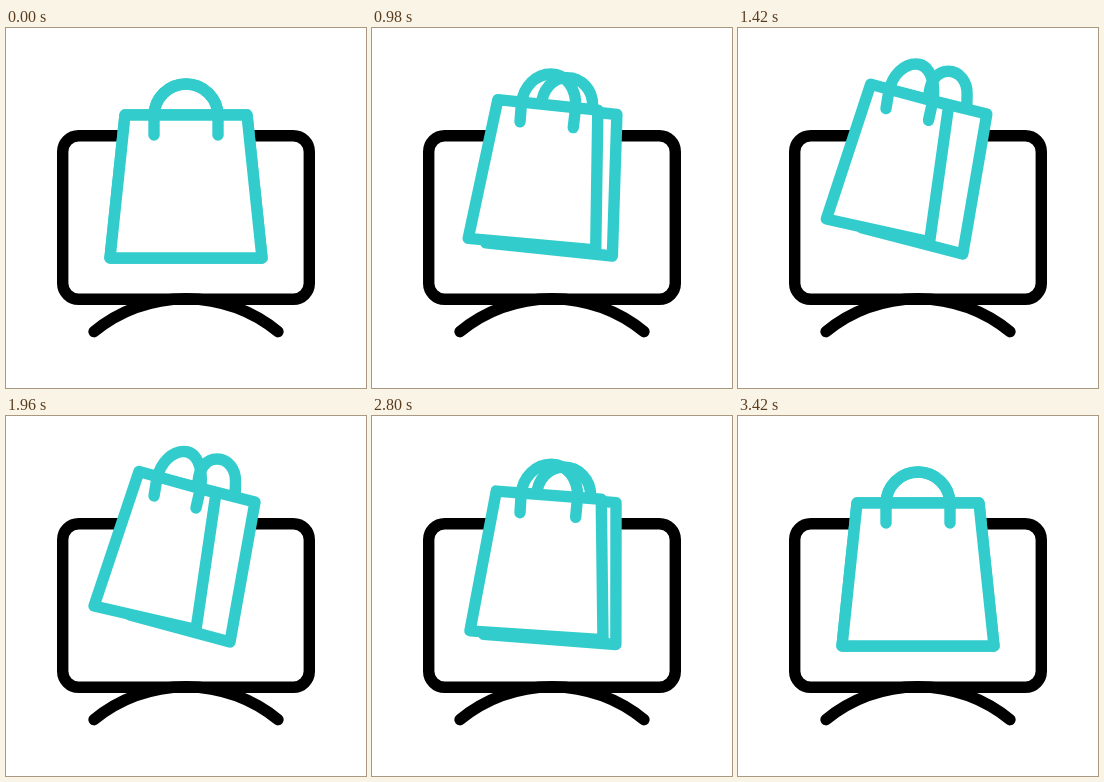
Write an HTML page without scripts that moves like this. It is 360 by 360 pixels and loops after 3.6 s.

```html
<!DOCTYPE html>
<html lang="en">
<head>
<meta charset="utf-8">
<title>Online shopping</title>
<style>
  html, body { margin: 0; width: 100%; height: 100%; overflow: hidden; background: #fff; }
  svg { display: block; width: 100%; height: 100%; }
  path, rect { fill: none; stroke-width: 11.4; stroke-linecap: round; stroke-linejoin: round; }
  .screen { stroke: #000; }
  .bag path { stroke: #33cccc; d: var(--flat); animation: turn 3.6s infinite; }
  .bag .panel { fill: #fff; }

  /* Each part morphs from the flat view to the turned view */
  .handle {
    --flat: path("M148 107 L148 88 C148 70.3 162.3 56 180 56 C197.7 56 212 70.3 212 88 L212 107");
  }
  .panel {
    --flat: path("M119 87 L241 87 L256 230 L104 230 Z");
  }
  .back.handle {
    --turned: path("M190 88 L192 66 C193 53 200 43 211 43 C222 43 230 53 229.5 66 L229 88");
  }
  .back.panel {
    --turned: path("M150 61 L249 86 L224 226 L124 199 Z");
  }
  .front.panel {
    --turned: path("M133 55.5 L210 77 L190 213.5 L88 190 Z");
  }
  .front.handle {
    --turned: path("M148 80 L151 62 C155 46 166 35.5 178 35.5 C190 35.5 197 50 195 70 L190 92");
  }

  @keyframes turn {
    0% { d: var(--flat); }
    5.556% { d: var(--flat); animation-timing-function: cubic-bezier(.83, 0, .25, 1); }
    46.667% { d: var(--turned); }
    53.889% { d: var(--turned); animation-timing-function: cubic-bezier(.86, 0, .27, 1); }
    95.556%, 100% { d: var(--flat); }
  }
</style>
</head>
<body>
<svg viewBox="0 0 360 360">
  <g class="screen">
    <rect x="56.7" y="107.7" width="246.6" height="163.6" rx="16"/>
    <path d="M88 303.7 A144.7 144.7 0 0 1 272 303.7"/>
  </g>
  <g class="bag">
    <path class="back handle"/>
    <path class="back panel"/>
    <path class="front panel"/>
    <path class="front handle"/>
  </g>
</svg>
</body>
</html>
```
